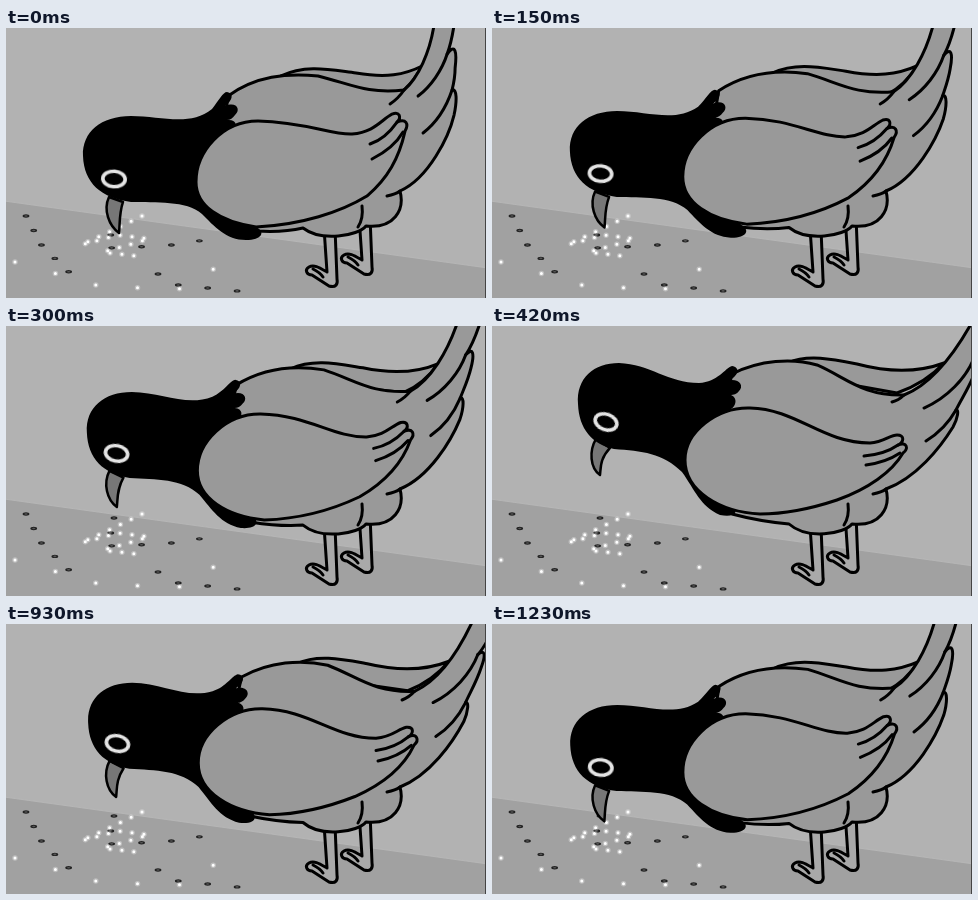
An HTML page without scripts that plays this animation: 480x270 px, repeating every 1290 ms.

```html
<!DOCTYPE html>
<html lang="en">
<head>
<meta charset="utf-8">
<title>Pecking bird</title>
<style>
html, body { margin: 0; width: 100%; height: 100%; overflow: hidden; background: #b2b2b2; }
svg { display: block; width: 100vw; height: 100vh; }

/* Progress between two poses: 0 = pecking, 1 = looking up. The body leads the head. */
:root {
  --head-ease: linear(0, .16 19%, 1 32.5%, 1.08 46%, 1 60.5%, .58 72%, .1 84%, .15 95%, 0);
  --body-ease: linear(0, .3 7%, .2 19%, 1 32.5%, 1.05 46%, 1 60.5%, .76 72%, .25 84%, .3 95%, .2);
}
@keyframes pose { from { d: var(--down); } to { d: var(--up); } }
@keyframes look {
  from { transform: translate(108px, 151px) rotate(4deg); }
  to { transform: translate(114px, 96px) rotate(20deg); }
}

.ink { fill: none; stroke: #000; stroke-width: 3; stroke-linecap: round; stroke-linejoin: round; }
.pose { d: var(--down); animation: pose 1290ms var(--body-ease) infinite; }
.head { animation-timing-function: var(--head-ease); }
.eye { animation: look 1290ms var(--head-ease) infinite; }
.plumage { fill: #999; }
.dots { fill: none; stroke-linecap: round; }

.far-wing {
  --down: path("M275 48 C300 36 325 42 350 45 C380 50 398 47 416 38 C408 52 402 60 392 66 L280 60 Z");
  --up: path("M296 37 C315 28 340 33 365 38 C395 46 425 47 452 37 C440 50 425 60 405 67 L310 50 Z");
}
.torso {
  --down: path("M222 68 C250 48 280 45 312 48 C345 56 360 66 398 62 C412 50 424 24 428 -4 L448 -4 C446 10 444 18 441 26 C449 15 451 23 449 40 C449 48 448 54 446 62 C451 60 451 73 448 87 C443 108 423 150 394 163 C399 182 388 201 360 198 C352 208 315 214 297 200 C280 204 265 204 250 203 L205 190 Z");
  --up: path("M240 48 C268 34 300 32 325 39 C355 52 370 70 412 69 C440 58 462 28 479 -2 L505 -2 C498 10 490 25 482 32 C488 28 490 32 484 44 C478 60 470 72 464 84 C467 83 466 92 461 101 C448 122 424 152 394 163 C399 182 388 201 360 198 C352 208 315 214 297 198 C275 196 255 192 240 188 L210 170 Z");
}
.tail-lines {
  --down: path("M441 26 C436 42 425 58 412 68 M446 62 C440 80 430 95 417 105 M398 62 C394 68 390 72 384 76");
  --up: path("M482 32 C474 52 455 72 432 82 M464 84 C456 98 447 107 434 115 M412 69 C408 73 404 75 400 76");
}
.hood {
  --down: path("M77 128 C76 104 95 88 125 88 C155 88 184 99 206 81 C213 72 217 64 221 64 C228 65 227 72 219 78 C231 73 235 82 229 87 C227 90 224 92 221 92 C230 91 232 97 227 102 L215 150 L250 199 C260 204 256 212 240 212 C220 212 208 198 196 186 C180 172 150 175 125 174 C95 170 78 155 77 128 Z");
  --up: path("M86 78 C84 52 102 37 127 37 C158 38 176 57 207 57 C226 56 233 42 240 40 C248 41 247 49 238 54 C248 53 252 60 247 65 C245 68 241 69 239 69 C246 72 244 80 239 83 L225 130 L240 176 C248 186 243 192 228 189 C208 180 203 164 190 146 C171 127 150 125 122 123 C100 118 87 103 86 78 Z");
}
.beak {
  fill: #777; stroke-width: 2.5;
  --down: path("M103 169 C97 182 103 198 113 205 C114 196 113 186 117 174 Z");
  --up: path("M104 113 C97 125 98 142 108 149 C109 140 108 133 118 122 Z");
}
.near-wing {
  --down: path("M190 154 C190 124 216 93 252 93 C300 94 325 107 346 106 C368 104 374 93 386 86 C393 83 396 89 391 94 C400 90 403 96 399 103 C393 130 382 150 361 168 C335 184 295 197 250 199 C214 194 190 178 190 154 Z");
  --up: path("M193 134 C193 106 225 81 258 82 C305 83 330 117 378 117 C392 116 398 109 405 109 C413 109 412 116 406 119 C415 115 417 123 411 127 C400 146 376 163 345 174 C315 184 290 188 268 188 C228 186 193 165 193 134 Z");
}
.wing-lines {
  --down: path("M391 94 C384 104 376 112 364 116 M397 104 C390 116 378 125 366 131");
  --up: path("M406 119 C396 126 384 129 372 130 M408 127 C399 133 389 137 374 139");
}
</style>
</head>
<body>
<svg viewBox="0 0 480 270" preserveAspectRatio="none">
  <defs>
    <path id="leg" d="M318 200 L321 244 C314 240 308 236 303 239 C298 242 301 247 306 247 L323 258 C330 260 332 256 331 251 L329 200 M307 241 C311 243 315 246 317 249"/>
    <!-- Seeds and crumbs are evenly spaced dots along loose trails -->
    <path id="seeds" d="M10 188 L18 218 L32 245 M54 192 L51 220 L65 219 L92 216 L104 208 M76 246 L86 257 L116 263" stroke-dasharray="0 15"/>
    <g id="crumbs">
      <path d="M136 188 L99 206 L75 217 L112 207 L143 211 L97 224 L129 228" stroke-dasharray="0 12"/>
      <path d="M9 234 L97 259 L180 261 L186 250 L239 228" stroke-dasharray="0 42"/>
    </g>
  </defs>

  <rect width="480" height="270" fill="#b2b2b2"/>
  <path d="M-2 173 L482 240 V274 H-2 Z" fill="#a1a1a1" stroke="#b6b6b6"/>

  <g class="dots">
    <g transform="scale(2 1)">
      <use href="#seeds" stroke="#222" stroke-width="3.4"/>
      <use href="#seeds" stroke="#555" stroke-width="1.6"/>
    </g>
    <g stroke="#fff">
      <use href="#crumbs" stroke-width="5.5" opacity=".3"/>
      <use href="#crumbs" stroke-width="3"/>
    </g>
  </g>

  <g class="ink">
    <path class="pose far-wing plumage"/>
    <g fill="#a9a9a9">
      <use href="#leg" x="35" y="-12"/>
      <use href="#leg"/>
    </g>
    <path class="pose torso plumage"/>
    <path class="pose tail-lines"/>
    <path d="M356 178 C357 186 356 193 352 199 M394 163 C390 166 386 167 381 168"/>
    <path class="pose head beak"/>
    <path class="pose head hood" fill="#000" stroke="none"/>
    <path class="pose near-wing plumage"/>
    <path class="pose wing-lines"/>
    <ellipse class="eye" rx="11.2" ry="7.8" fill="#000" stroke="#e4e4e4" stroke-width="3.6"/>
  </g>
  <rect x="479" width="1" height="270" fill="#444"/>
</svg>
</body>
</html>
```
